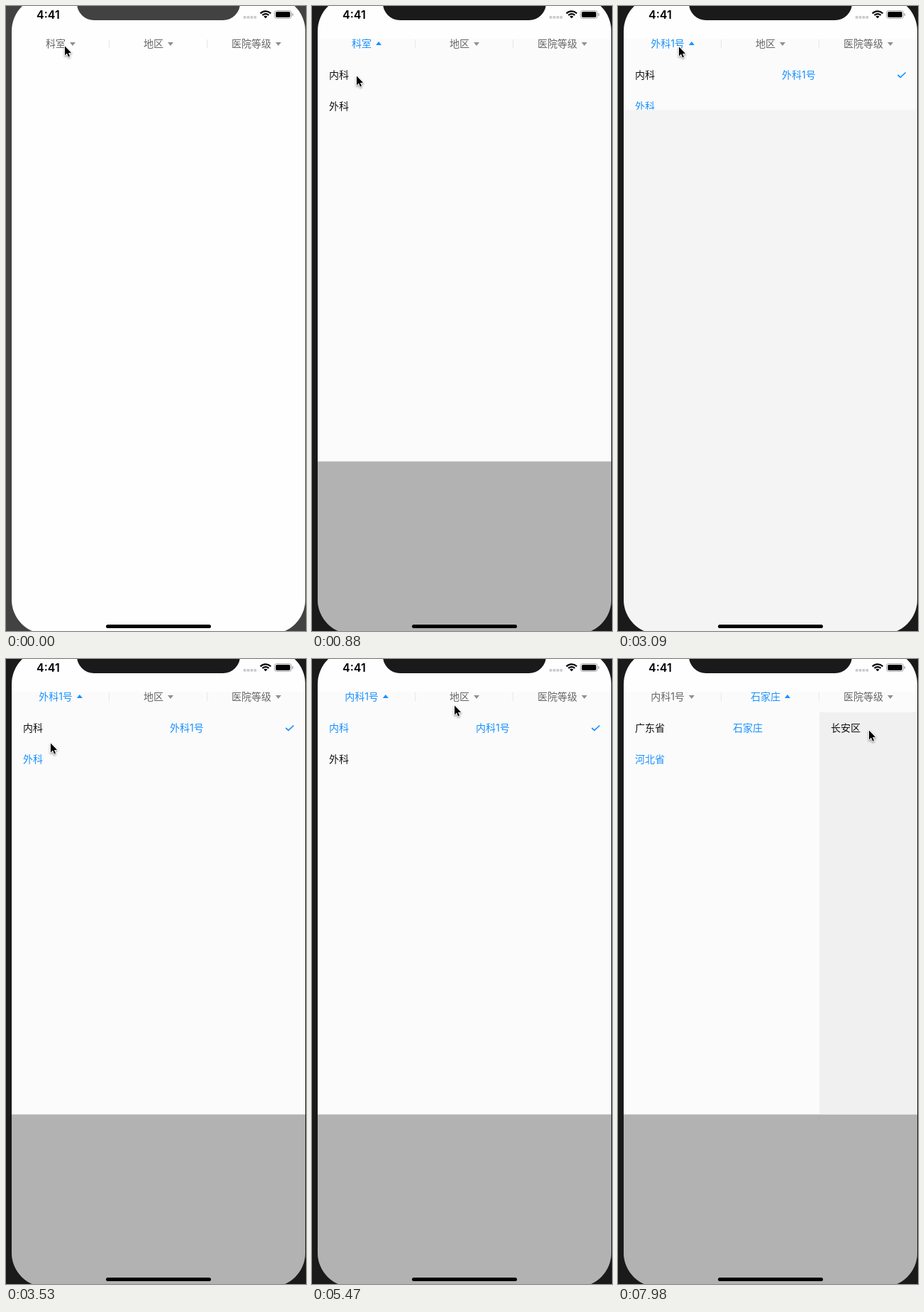
An HTML page with a canvas that plays this animation: 423x879 px, repeating every 8000 ms.

```html
<!DOCTYPE html>
<html lang="zh">
<head>
<meta charset="utf-8">
<style>
html, body { margin: 0; width: 100%; height: 100%; overflow: hidden; background: #1a1a1a; }
canvas { display: block; }
</style>
</head>
<body>
<canvas id="stage" width="423" height="879"></canvas>
<script>
const ctx = document.getElementById('stage').getContext('2d');
const LOOP = 8000, TICK = 147.7, LAST_TICK = 54;
const BLUE = '#1890ff', GREY = '#666', ARROW = '#8f8f8f', INK = '#111';
const CJK = 'Inter, "Noto Sans CJK SC", sans-serif';
const PHONE = { x: 8, y: -13, w: 414, h: 896, r: 48 };
const PANEL_TOP = 75, PANEL_HEIGHT = 565.5, ROW = 44, TAB = 138;

// The panel alternately opens and closes at these ticks
const toggles = [1.1, 16.16, 20.5, 31.15, 34.5];
const TOGGLE_TICKS = 2;

// Where the pointer comes to rest: [arrival tick, x, y]
const stops = [
  [0, 83, 56], [6, 63, 98], [9, 50, 133], [14, 281, 100], [21, 86, 57], [24, 63, 118],
  [26, 47, 97], [30, 241, 110], [35, 86, 58], [37, 201, 65], [39, 223, 58],
  [45, 90, 132], [49, 186, 112], [54, 354, 100]
];

// Prefix "*" marks a selected item, "+" a selected item with a tick
const scenes = [
  { at: 0, tab: 0, title: '科室', columns: [['内科', '外科'], []] },
  { at: 10, tab: 0, title: '外科', columns: [['内科', '*外科'], ['外科1号']] },
  { at: 17, tab: 0, title: '外科1号', columns: [] },
  { at: 20, tab: 0, title: '外科1号', columns: [['内科', '*外科'], ['+外科1号']] },
  { at: 28, tab: 0, title: '内科', columns: [['*内科', '外科'], ['内科1号']] },
  { at: 32, tab: 0, title: '内科1号', columns: [] },
  { at: 35, tab: 0, title: '内科1号', columns: [['*内科', '外科'], ['+内科1号']] },
  { at: 39, tab: 1, title: '地区', columns: [['*广东省', '河北省'], ['*广州'], ['+天河区']] },
  { at: 46, tab: 1, title: '河北省', columns: [['广东省', '*河北省'], ['石家庄'], []] },
  { at: 51, tab: 1, title: '石家庄', columns: [['广东省', '*河北省'], ['*石家庄'], ['长安区']] }
];

const clamp = v => Math.max(0, Math.min(1, v));
const easeInOut = p => p < .5 ? 2 * p * p : 1 - 2 * (1 - p) ** 2;

function openness(tick) {
  const passed = toggles.filter(at => at <= tick);
  if (!passed.length) return 0;
  const k = easeInOut(clamp((tick - passed[passed.length - 1]) / TOGGLE_TICKS));
  return passed.length % 2 ? k : 1 - k;
}

// Longer trips take longer
function cursorAt(tick) {
  const next = stops.findIndex(stop => stop[0] > tick);
  if (next < 0) return stops[stops.length - 1].slice(1);
  const [, x0, y0] = stops[next - 1], [arrival, x1, y1] = stops[next];
  const duration = Math.min(1 + Math.hypot(x1 - x0, y1 - y0) / 100, arrival - stops[next - 1][0]);
  const k = easeInOut(clamp(1 - (arrival - tick) / duration));
  return [x0 + (x1 - x0) * k, y0 + (y1 - y0) * k];
}

function rect(color, x, y, w, h, r = 0) {
  ctx.fillStyle = color;
  ctx.beginPath();
  ctx.roundRect(x, y, w, h, r);
  ctx.fill();
}

function text(str, x, y, color, font = '14px ' + CJK) {
  ctx.font = font;
  ctx.fillStyle = color;
  ctx.fillText(str, x, y);
}

function trace(points) {
  ctx.beginPath();
  points.forEach(([x, y]) => ctx.lineTo(x, y));
}

function drawTab(index, title, active) {
  ctx.font = '14px ' + CJK;
  const width = ctx.measureText(title).width;
  const left = PHONE.x + TAB * (index + .5) - (width + 14) / 2;
  const x = left + width + 6;
  const [base, tip] = active ? [55, 50] : [51, 56];
  text(title, left, 58, active ? BLUE : GREY);
  ctx.fillStyle = active ? BLUE : ARROW;
  trace([[x, base], [x + 8, base], [x + 4, tip]]);
  ctx.fill();
  if (index) rect('#e6e6e6', PHONE.x + TAB * index - 1, 47, 1, 12);
}

function drawCheck(y) {
  ctx.strokeStyle = BLUE;
  ctx.lineWidth = 1.7;
  trace([[394.5, y], [398.2, y + 3.4], [405.6, y - 3.5]]);
  ctx.stroke();
}

function drawLists(columns) {
  const width = PHONE.w / columns.length;
  if (columns.length === 3) rect('#f0f0f0', PHONE.x + 2 * width, PANEL_TOP, width, PANEL_HEIGHT);
  columns.forEach((items, column) => items.forEach((item, row) => {
    const label = item.replace(/^[*+]/, ''), middle = 97 + ROW * row;
    text(label, 24 + column * width, middle + 5, label === item ? INK : BLUE);
    if (item[0] === '+') drawCheck(middle);
  }));
}

function drawPanel(open, columns) {
  const height = PANEL_HEIGHT * open, bottom = PANEL_TOP + height;
  rect('#fbfbfb', PHONE.x, 46, PHONE.w, bottom - 46);
  rect(`rgba(0,0,0,${.3 * open})`, PHONE.x, bottom, PHONE.w, 879 - bottom);
  ctx.save();
  ctx.beginPath();
  ctx.rect(PHONE.x, PANEL_TOP, PHONE.w, height);
  ctx.clip();
  drawLists(columns);
  ctx.restore();
}

function drawStatusBar() {
  text('4:41', 43, 17.5, '#000', '600 16px Inter, sans-serif');
  for (let i = 0; i < 4; i++) rect('#cbcbcb', 334.7 + 4.9 * i, 14, 3.8, 3.8, 1);

  // Wi-Fi: a wedge of three rings
  ctx.strokeStyle = '#000';
  for (const [radius, width] of [[10, 2.3], [6.2, 2.3], [1.8, 3.6]]) {
    ctx.lineWidth = width;
    ctx.beginPath();
    ctx.arc(366, 17.3, radius, -Math.PI * .76, -Math.PI * .24);
    ctx.stroke();
  }

  ctx.strokeStyle = '#a6a6a6';
  ctx.lineWidth = 1;
  ctx.beginPath();
  ctx.roundRect(378.5, 6.5, 24, 11, 3.2);
  ctx.stroke();
  rect('#000', 380.3, 8, 20.4, 8, 1.8);
  rect('#a6a6a6', 403.6, 10, 1.4, 4, 1);
}

function drawCursor(x, y) {
  ctx.save();
  ctx.translate(x, y + .5);
  ctx.scale(.92, .92);
  trace([[0, 0], [0, 14], [3.2, 11], [5.5, 16.2], [7.6, 15.3], [5.4, 10.2], [9.8, 10]]);
  ctx.closePath();
  ctx.lineJoin = 'round';
  ctx.lineWidth = 1.8;
  ctx.strokeStyle = '#fff';
  ctx.shadowColor = 'rgba(0,0,0,.45)';
  ctx.shadowBlur = 3;
  ctx.shadowOffsetY = 1.5;
  ctx.stroke();
  ctx.shadowColor = 'transparent';
  ctx.fillStyle = '#000';
  ctx.fill();
  ctx.restore();
}

function draw(tick) {
  const open = openness(tick);
  const backdrop = tick < 1 ? '#424242' : '#1a1a1a';
  const past = scenes.filter(scene => scene.at <= tick);
  const scene = past[past.length - 1];
  const titles = ['科室', '地区', '医院等级'];
  past.forEach(({ tab, title }) => titles[tab] = title);

  rect(backdrop, 0, 0, 423, 879);
  ctx.save();
  ctx.beginPath();
  ctx.roundRect(PHONE.x, PHONE.y, PHONE.w, PHONE.h, PHONE.r);
  ctx.clip();
  rect('#fefefe', PHONE.x, 0, PHONE.w, 879);
  if (open > 0) drawPanel(open, scene.columns);
  ctx.restore();

  rect(backdrop, 100, -40, 230, 60, 24);
  drawStatusBar();
  titles.forEach((title, i) => drawTab(i, title, open > 0 && i === scene.tab));
  rect('#000', 141, 870, 148, 5, 2.5);
  drawCursor(...cursorAt(tick));
}

// The screen refreshes in coarse, even ticks
function frame() {
  const time = performance.now() % LOOP;
  draw(Math.min(LAST_TICK, Math.floor((time + 16) / TICK)));
  requestAnimationFrame(frame);
}
frame();
</script>
</body>
</html>
```
